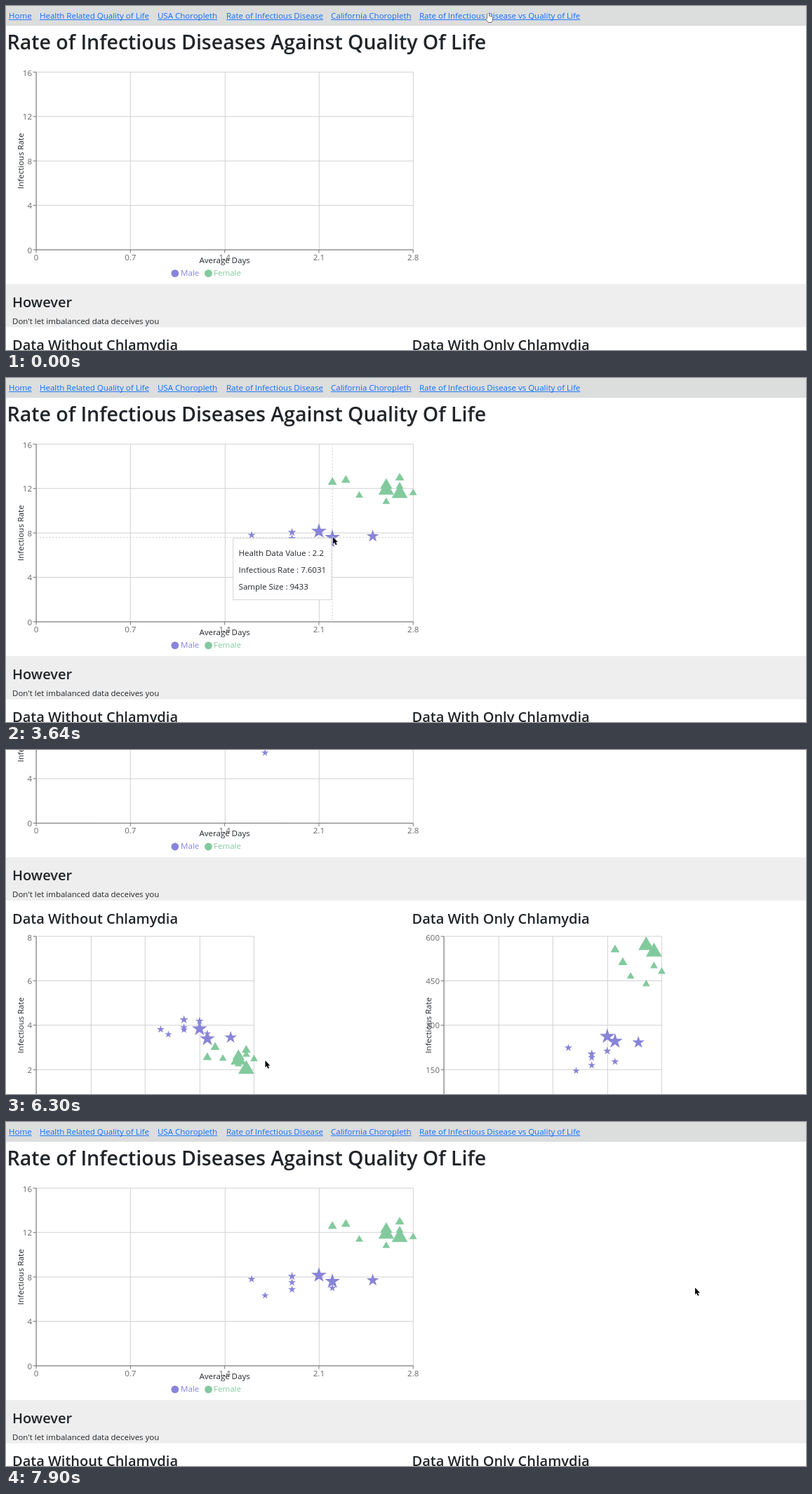
Animation, 1140 px wide and 491 px high, one loop 8760 ms. Source, as an HTML page with a canvas:

```html
<!DOCTYPE html>
<html lang="en">
<head>
<meta charset="utf-8">
<title>Rate of Infectious Diseases Against Quality Of Life</title>
<style>
html, body { margin: 0; width: 100%; height: 100%; overflow: hidden; background: #fff; }
canvas { display: block; }
</style>
</head>
<body>
<canvas id="stage" width="1140" height="491"></canvas>
<script>
const ctx = document.getElementById('stage').getContext('2d');
const LOOP = 8760, SCROLL = 243.6, PLOT_H = 253.7;
const MALE = '#8884d8', FEMALE = '#82ca9d', INK = '#212529', GREY = '#666';

// Each row: average days, symbol area, then the rate in each of the three charts.
const males = [
  [1.6, 38, 7.8, 3.81, 224], [1.7, 33, 6.33, 3.59, 146], [1.9, 47, 8.05, 4.25, 203],
  [1.9, 37, 7.5, 3.9, 191], [1.9, 37, 6.87, 3.8, 165], [2.1, 42, 8, 4.19, 213],
  [2.1, 148, 8.15, 3.84, 262], [2.2, 36, 7, 3.62, 177], [2.2, 148, 7.6, 3.39, 246],
  [2.5, 98, 7.7, 3.45, 242]
];
const females = [
  [2.2, 71, 12.56, 2.55, 555], [2.3, 71, 12.75, 3.01, 512], [2.4, 50, 11.37, 2.5, 465],
  [2.6, 50, 10.8, 2.25, 439], [2.6, 130, 12.3, 2.6, 574], [2.6, 215, 11.8463, 2.43, 569],
  [2.7, 71, 12.95, 2.88, 553], [2.7, 50, 12.2, 2.68, 500], [2.7, 225, 11.555, 2.02, 547.429],
  [2.8, 50, 11.6, 2.48, 481]
];
const charts = [
  { x: 43, y: 94.3, w: 537.2, max: 16 },
  { x: 43, y: 509.6, w: 310.4, max: 8 },
  { x: 624, y: 509.6, w: 310.4, max: 600 }
];
const tips = [
  { from: 1483, to: 2480, chart: 0, days: 2.7, rate: 11.555, size: 10340 },
  { from: 2480, to: 2900, chart: 0, days: 2.6, rate: 11.8463, size: 10266 },
  { from: 3390, to: 3700, chart: 0, days: 2.2, rate: 7.6031, size: 9433 },
  { from: 5760, to: 6200, chart: 1, days: 2.7, rate: 2.0204, size: 10340 },
  { from: 6940, to: 7020, chart: 2, days: 2.8, rate: 481.03, size: 6218 },
  { from: 7020, to: 7380, chart: 2, days: 2.7, rate: 547.429, size: 10340, shift: 11 }
];
// Time, x, y of the pointer.
const pointer = [
  [60, 687, 10], [400, 700, 60], [870, 719, 150], [1480, 562, 166], [1680, 558, 169.5],
  [2200, 558, 169.5], [2480, 541, 163], [2740, 536, 161], [2880, 550, 172], [3020, 676, 205],
  [3400, 466, 226], [3670, 466, 227], [3920, 701, 225], [4540, 622, 225.5], [4800, 562, 264.5],
  [5410, 562, 264.5], [5770, 342, 452], [6170, 343, 454], [6250, 350, 446], [6750, 1018, 350],
  [6950, 936, 317], [7080, 926, 291.5], [7340, 926, 291.5], [7880, 982, 236.5]
];
const links = [
  [4, 'Home'], [48, 'Health Related Quality of Life'], [216, 'USA Choropleth'],
  [314, 'Rate of Infectious Disease'], [463, 'California Choropleth'],
  [589, 'Rate of Infectious Disease vs Quality of Life']
];
const handPath = new Path2D('M-1.2 8V1q1.2-1.8 2.4 0V4.6l4 1q1.2.4 1.2 1.6v3l-1.4 3h-5l-3-4.6q.4-1.6 1.8-.6z');
const arrowPath = new Path2D('M0 0V9.8L2.2 7.8 3.8 11.6 5.5 10.9 3.9 7.2H6.9Z');

const clamp = v => Math.max(0, Math.min(1, v));
const progress = (t, start, length) => clamp((t - start) / length);
const smooth = u => u * u * (3 - 2 * u);

// The CSS "ease" curve, cubic-bezier(.25, .1, .25, 1).
function ease(x) {
  let lo = 0, hi = 1, s = 0.5;
  for (let i = 0; i < 18; i++) {
    s = (lo + hi) / 2;
    if (0.75 * s * (1 - s) + s ** 3 < x) lo = s; else hi = s;
  }
  return 0.3 * s * (1 - s) ** 2 + 3 * s * s * (1 - s) + s ** 3;
}

function setFont(size, weight = 400) {
  ctx.font = `${weight} ${size}px "Open Sans", "Noto Sans", sans-serif`;
}

function text(str, x, y, { size = 11.5, weight, color = INK, align = 'left' } = {}) {
  setFont(size, weight);
  ctx.fillStyle = color;
  ctx.textAlign = align;
  ctx.fillText(str, x, y);
}

function line(x1, y1, x2, y2, color, width = 1) {
  ctx.strokeStyle = color;
  ctx.lineWidth = width;
  ctx.beginPath();
  ctx.moveTo(x1, y1);
  ctx.lineTo(x2, y2);
  ctx.stroke();
}

function rect(x, y, w, h, color) {
  ctx.fillStyle = color;
  ctx.fillRect(x, y, w, h);
}

function dot(x, y, r, color) {
  ctx.fillStyle = color;
  ctx.beginPath();
  ctx.arc(x, y, r, 0, Math.PI * 2);
  ctx.fill();
}

// Star (5 tips) or triangle, built from points on one or two circles.
function symbol(x, y, area, star) {
  const r = star ? Math.sqrt(area * 0.8908) : 2 * Math.sqrt(area / (3 * Math.sqrt(3)));
  const count = star ? 10 : 3;
  ctx.beginPath();
  for (let i = 0; i < count; i++) {
    const a = i / count * Math.PI * 2 - Math.PI / 2;
    const d = star && i % 2 ? r * 0.382 : r;
    ctx.lineTo(x + d * Math.cos(a), y + d * Math.sin(a));
  }
  ctx.fill();
}

const plotX = (c, days) => c.x + c.w * days / 2.8;
const plotY = (c, rate) => c.y + PLOT_H * (1 - rate / c.max);

function drawGrid(c) {
  const bottom = c.y + PLOT_H;
  for (let i = 0; i <= 4; i++) {
    const x = Math.round(c.x + c.w * i / 4) + 0.3, y = c.y + PLOT_H * i / 4;
    line(x, c.y, x, bottom, '#ccc', 0.9);
    line(c.x, y, c.x + c.w, y, '#ccc', 0.9);
  }
  line(c.x, c.y, c.x, bottom, GREY, 0.9);
  line(c.x, bottom, c.x + c.w, bottom, GREY, 0.9);
  for (let i = 0; i <= 4; i++) {
    const x = c.x + c.w * i / 4, y = bottom - PLOT_H * i / 4;
    line(c.x - 4.5, y, c.x, y, GREY, 0.9);
    line(x, bottom, x, bottom + 4.5, GREY, 0.9);
    text(c.max * i / 4, c.x - 6, y + (i === 4 ? 5.7 : 4.5), { color: GREY, align: 'right' });
    text(+(0.7 * i).toFixed(1), x, bottom + 15, { color: GREY, align: 'center' });
  }
  const middle = c.x + c.w / 2;
  text('Average Days', middle, bottom + 19, { align: 'center' });
  ctx.save();
  ctx.translate(c.x - 18, c.y + PLOT_H / 2);
  ctx.rotate(-Math.PI / 2);
  text('Infectious Rate', 0, 0, { align: 'center' });
  ctx.restore();
  dot(middle - 70.8, bottom + 33.6, 5.4, MALE);
  text('Male', middle - 62.5, bottom + 37, { color: MALE });
  dot(middle - 23.2, bottom + 33.6, 5.4, FEMALE);
  text('Female', middle - 15.5, bottom + 37, { color: FEMALE });
}

function drawPoints(c, index, grow) {
  for (const [rows, color] of [[males, MALE], [females, FEMALE]]) {
    ctx.fillStyle = color;
    for (const row of rows) {
      symbol(plotX(c, row[0]), plotY(c, row[2 + index]), row[1] * grow, rows === males);
    }
  }
}

function tipBox(tip) {
  const c = charts[tip.chart];
  const lines = ['Health Data Value : ' + tip.days, 'Infectious Rate : ' + tip.rate, 'Sample Size : ' + tip.size];
  setFont(11.5);
  const w = Math.max(...lines.map(s => ctx.measureText(s).width)) + 16.5;
  const x = Math.max(c.x, plotX(c, tip.days) - 7.6 - w + (tip.shift || 0));
  return { lines, w, x, y: plotY(c, tip.rate) + 7.6 };
}

function drawCrosshair(tip) {
  const c = charts[tip.chart], x = plotX(c, tip.days), y = plotY(c, tip.rate);
  ctx.setLineDash([2.3, 2.3]);
  line(x, c.y, x, c.y + PLOT_H, '#ccc', 0.9);
  line(c.x, y, c.x + c.w, y, '#ccc', 0.9);
  ctx.setLineDash([]);
}

function drawTip(tip, t) {
  const c = charts[tip.chart], box = tipBox(tip);
  const before = tips[tips.indexOf(tip) - 1];
  const start = before && before.chart === tip.chart ? tipBox(before) : { x: c.x - 31.4, y: c.y };
  const u = ease(progress(t, tip.from, 400));
  const x = start.x + (box.x - start.x) * u, y = start.y + (box.y - start.y) * u;
  rect(x, y, box.w, 88.5, '#ccc');
  rect(x + 0.8, y + 0.8, box.w - 1.6, 86.9, '#fff');
  box.lines.forEach((s, i) => text(s, x + 8.3, y + 25.4 + 24.2 * i));
}

function drawPage(t) {
  rect(0, 0, 1140, 28.3, '#dcdddd');
  for (const [x, label] of links) {
    text(label, x, 18, { color: '#0d6efd' });
    rect(x, 19.2, ctx.measureText(label).width, 0.9, '#0d6efd');
  }
  text('Rate of Infectious Diseases Against Quality Of Life', 1.5, 62, { size: 28.5, weight: 600 });
  rect(0, 396.8, 1140, 61.7, '#eee');
  text('However', 9, 430, { size: 20, weight: 600 });
  text("Don't let imbalanced data deceives you", 9, 454);
  text('Data Without Chlamydia', 9, 491.2, { size: 20, weight: 600 });
  text('Data With Only Chlamydia', 578.5, 491.2, { size: 20, weight: 600 });

  const tip = tips.find(p => t >= p.from && t < p.to);
  charts.forEach((c, i) => {
    drawGrid(c);
    if (tip && tip.chart === i) drawCrosshair(tip);
    drawPoints(c, i, i ? 1 : ease(progress(t, 60, 400)));
  });
  if (tip) drawTip(tip, t);
}

function drawPointer(t) {
  const next = pointer.findIndex(p => p[0] > t);
  const b = pointer.at(next), a = next > 0 ? pointer[next - 1] : b;
  const u = a === b ? 0 : smooth(progress(t, a[0], b[0] - a[0]));
  const x = a[1] + (b[1] - a[1]) * u, y = a[2] + (b[2] - a[2]) * u;
  const hand = y < 20;
  ctx.save();
  ctx.translate(x, y);
  ctx.lineWidth = hand ? 1 : 1.2;
  ctx.lineJoin = 'round';
  ctx.strokeStyle = hand ? '#000' : '#fff';
  ctx.fillStyle = hand ? '#fff' : '#000';
  const shape = hand ? handPath : arrowPath;
  ctx.stroke(shape);
  ctx.fill(shape);
  ctx.restore();
}

function frame() {
  const t = performance.now() % LOOP;
  const scroll = SCROLL * (smooth(progress(t, 4620, 260)) - smooth(progress(t, 7400, 260)));
  rect(0, 0, 1140, 491, '#fff');
  ctx.save();
  ctx.translate(0, -scroll);
  drawPage(t);
  ctx.restore();
  drawPointer(t);
  requestAnimationFrame(frame);
}
frame();
</script>
</body>
</html>
```
